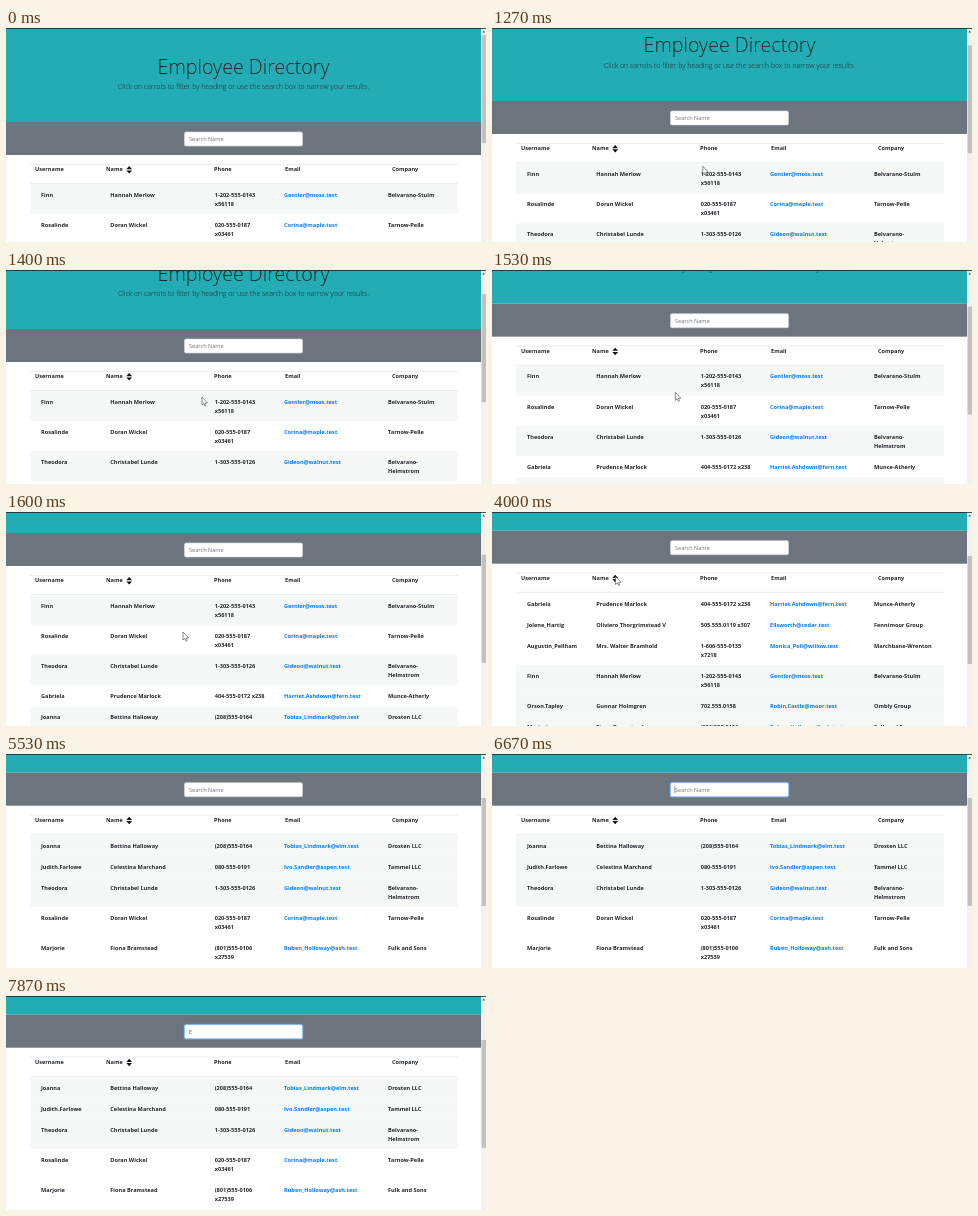
Write an HTML page with a canvas that moves like this. It is 480 px wide and 214 px high and loops after 8000 ms.

```html
<!DOCTYPE html>
<html lang="en">
<head>
<meta charset="utf-8">
<title>Employee Directory</title>
<style>
  html, body { margin: 0; width: 100%; height: 100%; overflow: hidden; background: #fff; }
  canvas { display: block; width: 480px; height: 214px; }
</style>
</head>
<body>
<canvas width="480" height="214"></canvas>
<script>
const ctx = document.querySelector('canvas').getContext('2d');
const LOOP = 8000, STEP = 200 / 3;
const FAMILY = '"Open Sans", "Noto Sans", sans-serif';
const INK = '#212529', LINK = '#007bff', TEAL = '#23acb3', GREY = '#6c757d', STRIPE = '#f6f8f8';

// "|" marks a line break inside a cell
const people = [
  ['Finn', 'Hannah Merlow', '1-202-555-0143|x56118', 'Gentler@moss.test', 'Belvarano-Stulm'],
  ['Rosalinde', 'Doran Wickel', '020-555-0187|x03461', 'Corina@maple.test', 'Tarnow-Pelle'],
  ['Theodora', 'Christabel Lunde', '1-303-555-0126', 'Gideon@walnut.test', 'Belvarano-|Helmstrom'],
  ['Gabriela', 'Prudence Marlock', '404-555-0172 x238', 'Harriet.Ashdown@fern.test', 'Munce-Atherly'],
  ['Joanna', 'Bettina Halloway', '(208)555-0164', 'Tobias_Lindmark@elm.test', 'Drosten LLC'],
  ['Augustin_Pellham', 'Mrs. Walter Bramhold', '1-606-555-0135|x7218', 'Monica_Pell@willow.test', 'Marchbane-Wrenton'],
  ['Orson.Tapley', 'Gunnar Holmgren', '702.555.0158', 'Robin.Castle@moor.test', 'Ombly Group'],
  ['Jolene_Hartig', 'Oliviero Thorgrimstead V', '505.555.0119 x307', 'Ellsworth@cedar.test', 'Fennimoor Group'],
  ['Marjorie', 'Fiona Bramstead', '(801)555-0106|x27539', 'Ruben_Holloway@ash.test', 'Fulk and Sons'],
  ['Judith.Farlowe', 'Celestina Marchand', '080-555-0191', 'Ivo.Sandler@aspen.test', 'Tammel LLC']
];
const ascending = [...people].sort((a, b) => a[1] < b[1] ? -1 : 1);
const descending = [...ascending].reverse();

const headings = [['Username', 29], ['Name', 100], ['Phone', 208], ['Email', 279], ['Company', 386]];
const cellX = [35, 104.3, 208.7, 278, 382];

// Each key is [time, ...values]
const scrollKeys = [[1066, 0], [1400, 35], [1600, 73], [1800, 75.3]];
const pointerKeys = [[1130, 226, 150], [1400, 196, 127], [1600, 177, 120], [1930, 173, 116],
  [2470, 125.5, 68], [2800, 123, 64], [3930, 123, 64], [4000, 123.5, 64.5], [4400, 123.5, 64.5], [5130, 205, 50]];

const SORT_DOWN = 2860, SORT_UP = 4325, POINTER_IN = 1125, POINTER_OUT = 5190, FOCUS = 5590, TYPED = 7325;

function valueAt(keys, t) {
  const next = keys.findIndex(k => k[0] > t);
  if (next === 0) return keys[0].slice(1);
  if (next < 0) return keys[keys.length - 1].slice(1);
  const a = keys[next - 1], b = keys[next];
  const p = (t - a[0]) / (b[0] - a[0]);
  return a.slice(1).map((v, i) => v + (b[i + 1] - v) * p);
}

function box(color, x, y, w, h) {
  ctx.fillStyle = color;
  ctx.fillRect(x, y, w, h);
}

function text(str, x, y, size, weight, color = INK, align = 'left') {
  ctx.font = `${weight} ${size}px ${FAMILY}`;
  ctx.textAlign = align;
  ctx.fillStyle = color;
  ctx.fillText(str, x, y);
}

function polygon(color, ...points) {
  ctx.fillStyle = color;
  ctx.beginPath();
  points.forEach(([x, y]) => ctx.lineTo(x, y));
  ctx.closePath();
  ctx.fill();
}

function drawSearch(t) {
  const focused = t >= FOCUS;
  ctx.beginPath();
  ctx.roundRect(178.5, 104, 118, 14, 1.5);
  if (focused) {
    ctx.strokeStyle = 'rgba(100,170,250,.5)';
    ctx.lineWidth = 2;
    ctx.stroke();
  }
  ctx.fillStyle = '#fff';
  ctx.fill();
  ctx.strokeStyle = focused ? '#80bdff' : '#ced4da';
  ctx.lineWidth = 0.7;
  ctx.stroke();

  const typed = t >= TYPED;
  if (typed) text('E', 183, 113.2, 5.6, 400, '#495057');
  else text('Search Name', 183, 113.2, 5.6, 400, GREY);
  const blink = (t - (typed ? TYPED : FOCUS)) % 1070 < 535;
  if (focused && blink) box('#495057', typed ? 186.2 : 182.6, 107.6, 0.6, 7);
}

function drawTable(t) {
  box('#dee2e6', 24, 136, 428, 0.6);
  box('#dee2e6', 24, 155.2, 428, 0.6);
  headings.forEach(([label, x]) => text(label, x, 143.4, 5.6, 700));
  polygon('#111', [123.2, 138], [126.1, 141.2], [120.3, 141.2]);
  polygon('#111', [123.2, 145.6], [126.1, 142.4], [120.3, 142.4]);

  const sorted = t >= SORT_DOWN, up = t >= SORT_UP;
  const rows = up ? ascending : sorted ? descending : people;
  let y = 155.8;
  rows.forEach((row, i) => {
    const height = row.some(cell => cell.includes('|')) ? 30.2 : 21;
    const shaded = sorted ? (i < 3) === up : i % 2 === 0;
    if (shaded) box(STRIPE, 24, y, 428, height);
    row.forEach((cell, c) => cell.split('|').forEach((line, n) =>
      text(line, cellX[c], y + 13 + n * 9, 5.6, 700, c === 3 ? LINK : INK)));
    y += height;
  });
}

function drawScrollbar(scroll) {
  box('#f1f1f1', 475, 0, 5, 214);
  box('#c1c1c1', 475.6, 7 + scroll * 0.49, 4.4, 108);
  polygon('#505050', [477.7, 2.6], [479, 4.4], [476.4, 4.4]);
}

function drawPointer([x, y]) {
  const shape = [[0, 0], [0, 8], [1.8, 6.4], [3, 9.1], [4.2, 8.6], [3.1, 6], [5.5, 5.8]];
  polygon('#fff', ...shape.map(([dx, dy]) => [x + dx, y + dy]));
  ctx.strokeStyle = '#444';
  ctx.lineWidth = 0.6;
  ctx.stroke();
}

function draw(t) {
  const [scroll] = valueAt(scrollKeys, t);
  box('#fff', 0, 0, 480, 214);
  ctx.save();
  ctx.translate(0, -scroll);
  box(TEAL, 0, 0, 475, 94);
  box(GREY, 0, 94, 475, 33);
  text('Employee Directory', 237.5, 45.5, 19.7, 300, INK, 'center');
  text('Click on carrots to filter by heading or use the search box to narrow your results.',
    237.5, 61, 7, 300, INK, 'center');
  drawSearch(t);
  drawTable(t);
  ctx.restore();
  drawScrollbar(scroll);
  box('#1c2226', 0, 0, 480, 0.8);
  if (t >= POINTER_IN && t < POINTER_OUT) drawPointer(valueAt(pointerKeys, t));
}

const start = performance.now();
function tick() {
  const t = (performance.now() - start) % LOOP;
  draw(Math.floor((t + 5) / STEP) * STEP);
  requestAnimationFrame(tick);
}
tick();
</script>
</body>
</html>
```
